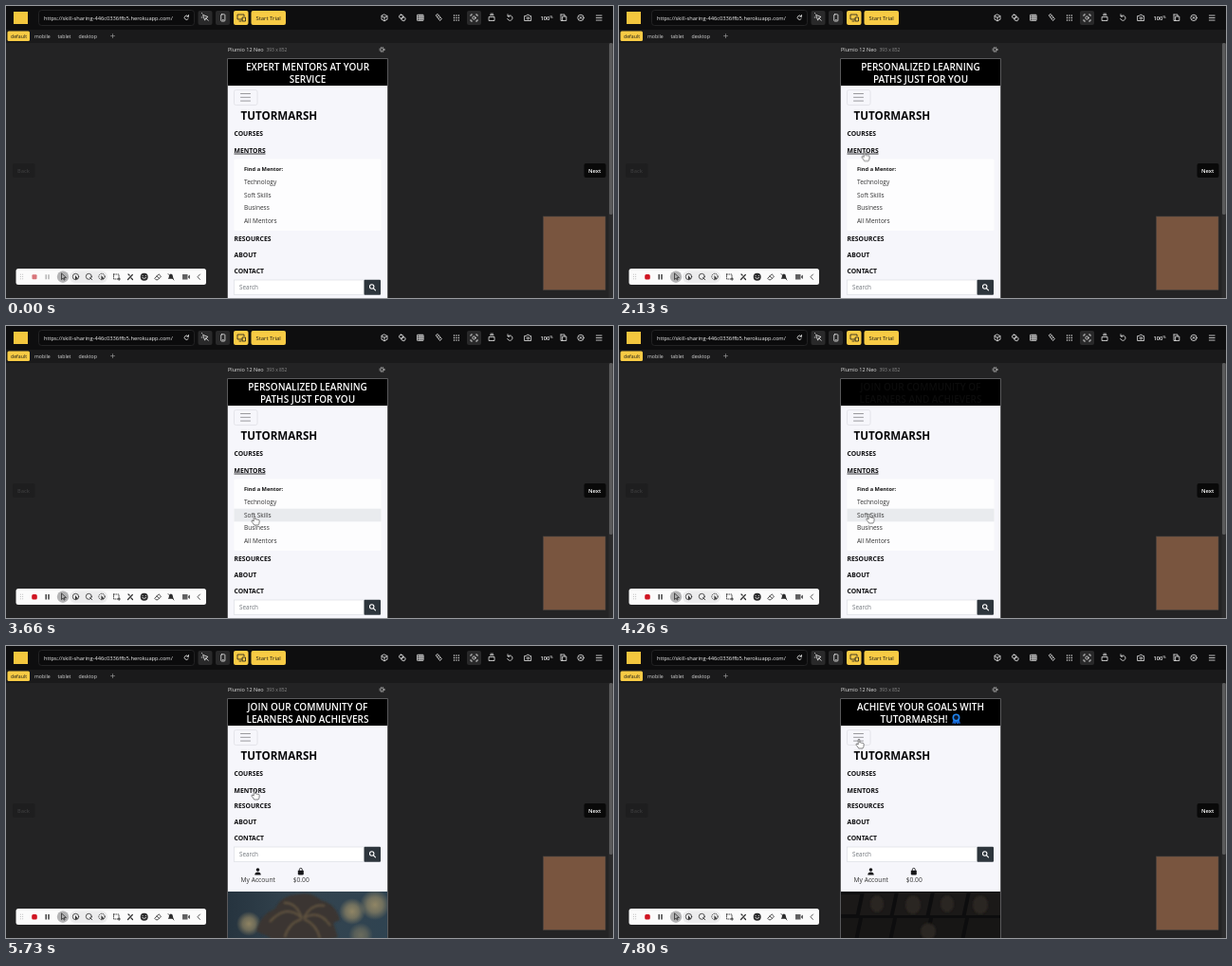
An HTML page that plays this animation: 640x308 px, repeating every 8000 ms.

```html
<!DOCTYPE html>
<html lang="en">
<head>
<meta charset="utf-8">
<title>Responsive preview</title>
<style>
html, body { margin: 0; width: 100%; height: 100%; overflow: hidden; background: #232324; }
svg { display: block; width: 100vw; height: 100vh; font-family: "Open Sans", "Noto Sans", sans-serif; }
.line { fill: none; stroke: currentColor; stroke-width: .8; stroke-linecap: round; stroke-linejoin: round; }
.solid { fill: currentColor; stroke: none; }
.semi { font-weight: 600; }
.bold { font-weight: 700; }
.nav { font-size: 6.8px; font-weight: 700; fill: #0b0b0d; }
.links { font-size: 6.5px; fill: #333; }
.banner { font-size: 10px; font-weight: 600; fill: #fff; text-anchor: middle; }

/* Everything shares one 8 s timeline. */
.message, .cursor, .arrow, .hand, .row, .menu, .lower, .rec, .idle, .slide {
  animation: 8s linear infinite both;
}
.message { animation-timing-function: ease; }
.m1 { animation-name: m1; }
.m2 { animation-name: m2; }
.m3 { animation-name: m3; }
.m4 { animation-name: m4; }
@keyframes m1 { 0%, 9.125% { opacity: 1 } 15.375%, 100% { opacity: 0 } }
@keyframes m2 { 0%, 15.375% { opacity: 0 } 21.625%, 46.625% { opacity: 1 } 52.875%, 100% { opacity: 0 } }
@keyframes m3 { 0%, 52.875% { opacity: 0 } 59.125%, 84.125% { opacity: 1 } 90.375%, 100% { opacity: 0 } }
@keyframes m4 { 0%, 90.375% { opacity: 0 } 96.625%, 100% { opacity: 1 } }

.cursor { animation-name: travel; animation-timing-function: ease-in-out; }
@keyframes travel {
  0%, 18.25% { transform: translate(46px, 284px) }
  26%, 29.1% { transform: translate(259px, 153.5px) }
  33.2%, 35% { transform: translate(261px, 178px) }
  45%, 49% { transform: translate(262px, 200px) }
  60%, 62% { transform: translate(268px, 193.5px) }
  70%, 72% { transform: translate(262px, 152px) }
  77.5%, 100% { transform: translate(253px, 98px) }
}
.arrow, .hand, .row, .menu, .lower, .rec, .idle { animation-timing-function: step-end; }
.arrow { animation-name: arrow; }
.hand { animation-name: hand; }
@keyframes arrow { 0% { opacity: 0 } 18.25% { opacity: 1 } 24.5%, 100% { opacity: 0 } }
@keyframes hand { 0% { opacity: 0 } 24.5%, 100% { opacity: 1 } }

.tech { animation-name: tech; }
.soft { animation-name: soft; }
@keyframes tech { 0% { opacity: 0 } 33.2% { opacity: 1 } 41.5% { opacity: 0 } 63.5% { opacity: 1 } 66%, 100% { opacity: 0 } }
@keyframes soft { 0% { opacity: 0 } 41.5% { opacity: 1 } 63.5%, 100% { opacity: 0 } }

.menu { animation-name: menu; }
.lower { animation-name: lift; }
@keyframes menu { 0% { opacity: 1 } 71%, 100% { opacity: 0 } }
@keyframes lift { 0% { transform: none } 71%, 100% { transform: translateY(-77px) } }

.idle { animation-name: idle; }
.rec { animation-name: rec; }
@keyframes idle { 0% { opacity: 1 } 7.5%, 100% { opacity: 0 } }
@keyframes rec { 0% { opacity: 0 } 7.5%, 100% { opacity: 1 } }

.slide { animation-name: slide; }
@keyframes slide { 0%, 89% { opacity: 0 } 95%, 100% { opacity: 1 } }
</style>
</head>
<body>
<svg viewBox="0 0 640 308" preserveAspectRatio="none">
  <defs>
    <clipPath id="screen"><rect x="234" y="56" width="168" height="252"/></clipPath>
    <clipPath id="hero"><rect width="168" height="60"/></clipPath>
    <linearGradient id="dusk">
      <stop stop-color="#26343f"/><stop offset=".45" stop-color="#34444f"/><stop offset="1" stop-color="#2f4351"/>
    </linearGradient>
    <radialGradient id="glow">
      <stop stop-color="#a8966a" stop-opacity=".8"/><stop offset=".5" stop-color="#a8966a" stop-opacity=".55"/>
      <stop offset="1" stop-color="#a8966a" stop-opacity="0"/>
    </radialGradient>
    <filter id="blur"><feGaussianBlur stdDeviation="1.2"/></filter>
  </defs>

  <!-- Application frame -->
  <rect width="640" height="308" fill="#232324"/>
  <rect width="640" height="25" fill="#0e0e0f"/>
  <rect y="25" width="640" height="14" fill="#1a1a1b"/>
  <rect x="635.5" y="39" width="4.5" height="269" fill="#2c2c2d"/>
  <rect x="636" y="39" width="3.6" height="181" rx="1.5" fill="#5b5b5c"/>

  <rect x="8" y="6" width="15" height="13" fill="#f3c63e"/>
  <rect x="34.5" y="4.5" width="164" height="16" rx="3" fill="#0b0b0c" stroke="#2d2d2e" stroke-width=".7"/>
  <text x="40" y="14.7" font-size="5.75" fill="#f2f2f2">https://skill-sharing-446c0336ffb5.herokuapp.com/</text>

  <g fill="#29292a">
    <rect x="202.5" y="5" width="15" height="15" rx="2"/>
    <rect x="221" y="5" width="15" height="15" rx="2"/>
    <rect x="486" y="5" width="15" height="15" rx="2"/>
  </g>
  <g fill="#f8cb45">
    <rect x="240" y="5" width="15.5" height="15" rx="2"/>
    <rect x="258.5" y="5" width="36.5" height="15" rx="2"/>
    <rect x="1.5" y="26.5" width="23.5" height="10.5" rx="1.5"/>
  </g>
  <text x="263.5" y="14.8" font-size="5.9" font-weight="500" fill="#171717">Start Trial</text>

  <g class="line" color="#e9e9e9">
    <path d="M192.2 11A2.2 2.2 0 1 0 192.300 13.300M192.500 9.500v1.700h-1.700"/>
    <path d="M208 9.500l5 2-2.200 1-1 2.300zM211 13l2.200 2.300M207 8l-.6-.6M207 12h-.8"/>
    <rect x="226.700" y="8.800" width="4.200" height="7.200" rx=".8"/>
    <path d="M228.300 14.700h1"/>
    <path color="#1b1b1b" d="M249 14h-5V9h7v1.500M246 16h2M249.500 12h3v4h-3z"/>
    <path d="M399 9l3 1.600v3.600l-3 1.600-3-1.600v-3.600zM396 10.600l3 1.600 3-1.600M399 12.200v3.600"/>
    <rect x="414.800" y="9.500" width="4" height="3.600" rx="1" transform="rotate(20 417 11)"/>
    <rect x="417" y="11.800" width="4" height="3.600" rx="1" transform="rotate(20 419 13.500)"/>
    <path d="M434 9.300h6v6h-6zM436 9.300v6M438 9.300v6M434 11.300h6M434 13.300h6"/>
    <path d="M453.500 9.600l1.600-1.200 4.300 5.300-1.600 1.500zM455 11.300l1-.8M456.500 13l1-.8"/>
    <path d="M490 10.500V9h1.500M495.500 9h1.500v1.500M497 14.500V16h-1.500M491.500 16H490v-1.500"/>
    <circle cx="493.500" cy="12.500" r="1.600"/>
    <path d="M509.500 11.500h5.500v4h-5.500zM510.500 9.600h3.500M511 8.200h2.500"/>
    <path d="M529.300 10.800A2.700 2.700 0 1 1 528.700 13.500M529 8.800v2.200h2.200"/>
    <path d="M547 10.500h1.500l.8-1.200h2l.8 1.200h1.500v5H547z"/>
    <circle cx="550.300" cy="12.800" r="1.200"/>
    <path d="M585 9h4v2M585 9v6.500h2M587 11h3.800v4.500H587z"/>
    <circle cx="606" cy="12.400" r="3.200"/>
    <path d="M604.800 11.200l2.400 2.400M607.200 11.200l-2.400 2.400"/>
    <path d="M622.300 10h5.800M622.300 12.500h5.800M622.300 15h5.800"/>
    <path stroke-dasharray="0 2.400" style="stroke-width:1.4" d="M472.500 10h5M472.500 12.500h5M472.500 15h5"/>
  </g>
  <text class="semi" x="563.5" y="14.5" font-size="5.8" fill="#f4f4f4">100<tspan font-size="3.5" dy="-1.5">%</tspan></text>

  <g font-size="5.2" fill="#d8d8d8">
    <text x="5" y="33.6" fill="#161616">default</text>
    <text x="30" y="33.6">mobile</text>
    <text x="54.5" y="33.6">tablet</text>
    <text x="76.5" y="33.6">desktop</text>
  </g>
  <path class="line" color="#aaa" style="stroke-width:.6" d="M110.500 31.600h4M112.500 29.600v4"/>

  <text x="234" y="48" font-size="5.5" fill="#dedede">Plumio 12 Neo</text>
  <text x="274.5" y="48" font-size="4.9" fill="#8d8d8d">393 x 852</text>
  <g class="line" color="#bdbdbd">
    <circle cx="396.5" cy="46" r="1.7"/>
    <circle cx="396.5" cy="46" r="2.700" stroke-dasharray="1 1.200" stroke-linecap="butt"/>
  </g>

  <rect x="7" y="166" width="23.5" height="15" rx="2" fill="#1e1e1f"/>
  <text class="semi" x="12" y="175.7" font-size="5.6" fill="#3b3b3c">Back</text>
  <rect x="609.5" y="166" width="23" height="15" rx="2" fill="#090909"/>
  <text class="semi" x="614" y="175.7" font-size="5.8" fill="#fff">Next</text>

  <!-- Previewed page -->
  <rect x="233.5" y="55.5" width="169" height="260" fill="#f6f6fb" stroke="#444445" stroke-width=".7"/>
  <g clip-path="url(#screen)">
    <rect x="234" y="56" width="168" height="28" fill="#000"/>
    <g class="banner">
      <g class="message m1"><text x="318" y="68">EXPERT MENTORS AT YOUR</text><text x="318" y="80.5">SERVICE</text></g>
      <g class="message m2"><text x="318" y="68">PERSONALIZED LEARNING</text><text x="318" y="80.5">PATHS JUST FOR YOU</text></g>
      <g class="message m3"><text x="318" y="68">JOIN OUR COMMUNITY OF</text><text x="318" y="80.5">LEARNERS AND ACHIEVERS</text></g>
      <g class="message m4">
        <text x="318" y="68">ACHIEVE YOUR GOALS WITH</text><text x="311" y="80.5">TUTORMARSH!</text>
        <path d="M352.800 77l-1.600 4.800 2.200-.4 1.200 1.200 1-2 1 2 1.200-1.200 2.200.4-1.600-4.800z" fill="#1663cf"/>
        <circle cx="355.5" cy="75.5" r="3.2" fill="#0b1830" stroke="#1f86f2" stroke-width="1.6"/>
      </g>
    </g>

    <rect x="240.5" y="88.5" width="24.5" height="16" rx="2" fill="none" stroke="#e0e0e6" stroke-width=".8"/>
    <path class="line" color="#828286" d="M247.500 92.500h10M247.500 96.300h10M247.500 100.100h10"/>
    <text class="bold" x="247.5" y="120.3" font-size="11.6" fill="#08080a">TUTORMARSH</text>
    <g class="nav"><text x="240.5" y="137">COURSES</text><text x="240.5" y="154.5">MENTORS</text></g>

    <g class="menu">
      <path d="M240.500 156h33" stroke="#0b0b0d" stroke-width=".8"/>
      <rect x="240.5" y="161.5" width="155" height="75.5" rx="1.5" fill="#fdfdfe"/>
      <rect class="row tech" x="240.5" y="179" width="155" height="13.7" fill="#e9ebee"/>
      <rect class="row soft" x="240.5" y="192.7" width="155" height="13.6" fill="#e9ebee"/>
      <text class="bold" x="251" y="173.7" font-size="5.7" fill="#111">Find a Mentor:</text>
      <g class="links">
        <text x="251" y="188">Technology</text>
        <text x="251" y="201.7">Soft Skills</text>
        <text x="251" y="215.4">Business</text>
        <text x="251" y="229.2">All Mentors</text>
      </g>
    </g>

    <g class="lower">
      <g class="nav">
        <text x="240.5" y="248.2">RESOURCES</text>
        <text x="240.5" y="265.2">ABOUT</text>
        <text x="240.5" y="282.4">CONTACT</text>
      </g>
      <rect x="240.5" y="289" width="138" height="15.5" fill="#fff" stroke="#dcdfe4" stroke-width=".7"/>
      <text x="246" y="299.3" font-size="6.3" fill="#70757b">Search</text>
      <rect x="377.5" y="288.7" width="17.5" height="16" rx="1" fill="#2d353c"/>
      <g class="line" color="#fff" style="stroke-width:1.1"><circle cx="385.7" cy="296" r="2.2"/><path d="M387.500 297.800l2 2"/></g>
      <g fill="#161619">
        <circle cx="265.5" cy="313" r="1.8"/>
        <path d="M262.300 318.500q0-3 3.200-3t3.200 3z"/>
        <path d="M307.800 313.700h6v3.600q0 1.200-1.200 1.200h-3.600q-1.200 0-1.200-1.200z"/>
        <path class="line" color="#161619" d="M309.300 314v-1.200a1.500 1.500 0 0 1 3 0v1.200"/>
      </g>
      <g fill="#333" font-size="6.7"><text x="247.5" y="326.4">My Account</text><text x="302.7" y="326.4">$0.00</text></g>

      <g transform="translate(234 336)" clip-path="url(#hero)">
        <rect width="168" height="60" fill="url(#dusk)"/>
        <g fill="url(#glow)">
          <circle cx="155" cy="14" r="16"/><circle cx="131" cy="21" r="14"/>
          <circle cx="22" cy="34" r="13"/><circle cx="140" cy="46" r="13" opacity=".6"/>
        </g>
        <g filter="url(#blur)">
          <path fill="#3a3630" d="M30 42q4-18 20-24 6-14 24-15 14-3 24 6 16 4 20 21l-7 3 5 15-14 4-4 8H48l-4-12z"/>
          <path fill="none" stroke="#61523f" stroke-width="2" d="M78 28q-16-16-34 4M78 28q-6-17-19-16M80 28q8-16 22-13M80 28q16-10 28 8M78 29q-14 4-18 19M80 29q13 5 17 20"/>
        </g>
        <g class="slide">
          <rect width="168" height="60" fill="#0d0d0e"/>
          <g transform="skewX(-12)" fill="#1b1918">
            <path d="M-8 3h29v21H-8zM25 2h32v23H25zM61 1h34v24H61zM99 1h34v24H99zM137 1h44v24h-44z"/>
            <path d="M-5 28h30v24H-5zM29 28h32v24H29zM65 28h34v24H65zM103 28h34v24h-34zM141 28h44v24h-44z" fill="#171615"/>
          </g>
          <g fill="#2b2521" filter="url(#blur)">
            <ellipse cx="38" cy="13" rx="7" ry="9"/><ellipse cx="76" cy="14" rx="8" ry="10"/>
            <ellipse cx="112" cy="13" rx="7" ry="9"/><ellipse cx="147" cy="14" rx="8" ry="10"/>
            <ellipse cx="92" cy="42" rx="8" ry="9"/>
          </g>
        </g>
      </g>
    </g>
  </g>

  <!-- Picture overlay -->
  <rect x="566.5" y="222" width="65.5" height="77.5" fill="#79553f" stroke="#4d4642" stroke-width=".6"/>

  <!-- Recorder toolbar -->
  <rect x="10.5" y="277" width="200.5" height="17" rx="2.5" fill="#fbfbfb"/>
  <path class="line" color="#999" stroke-dasharray="0 2.300" d="M15.300 283.200v5M17.700 283.200v5"/>
  <g class="idle"><rect x="27.5" y="283.3" width="5" height="5" rx="1" fill="#d8757b"/><path d="M42.200 283.300v5M45 283.300v5" stroke="#aaa" stroke-width="1.3"/></g>
  <g class="rec"><rect x="27.2" y="283" width="5.6" height="5.6" rx="1.7" fill="#d01522"/><path d="M42.200 283v5.500M45 283v5.500" stroke="#333" stroke-width="1.4"/></g>
  <rect x="67" y="279.5" width="40" height="12.5" rx="6" fill="#ececed"/>
  <circle cx="60" cy="285.7" r="6.2" fill="#b4b4b5"/>
  <g class="line" color="#2c2c2d">
    <path d="M58.500 282.300v6.300l1.600-1.500 1.200 2 .8-.5-1-2h2z"/>
    <circle cx="73.5" cy="285.5" r="3.2"/><path class="solid" d="M73 284v5l1.300-1.200 1.800.2z"/>
    <circle cx="87.3" cy="285.3" r="3"/><path d="M88.500 286.500l2.300 2.300"/>
    <circle cx="101" cy="285.5" r="3.2" stroke-dasharray="1 1.300"/><path class="solid" d="M100.500 284v5l1.300-1.200 1.800.2z"/>
    <path stroke-dasharray="1 1.300" d="M113.500 283h5.500v5h-5.500z"/><path d="M118 288h2.500M119.200 286.800v2.500"/>
    <path style="stroke-width:1.2" d="M128.500 288.500l4.800-5M129 283l1.200 1.200M132 287l1.500 1.500"/>
    <circle class="solid" cx="145.7" cy="285.7" r="4"/>
    <path color="#fff" class="line" d="M144 284.500h.1M147.300 284.500h.1M143.800 286.700q1.900 1.800 3.800 0"/>
    <path d="M157 287l4-4.200 2.500 2.300-3.500 3.700h-1.500zM159 285l2.500 2.300"/>
    <path class="solid" d="M170.700 287.800q1.200-1 1.200-2.800 0-2.200 2-2.400 2 .2 2 2.400 0 1.800 1.200 2.800z"/><path d="M171 282.500l6 6.500"/>
    <path class="solid" d="M186 283h5.500v5.500H186zM192 285l2-1.500v4.500l-2-1.500z" opacity=".75"/>
    <path d="M204.500 283l-2.500 2.700 2.500 2.700"/>
  </g>

  <g class="cursor">
    <path class="arrow" d="M0 0v8l1.900-1.700 1.300 2.700 1.200-.6-1.300-2.600h2.600z" fill="#fff" stroke="#111" stroke-width=".5"/>
    <path class="hand" d="M-.8.700Q0-.5.800.7V4q.8-.6 1.500.2.900-.5 1.500.3 1.200-.3 1.300.9V7Q5 8.700 4 10H-.3Q-1.500 8-3 6.200q-.2-1.300 1-1.200l1.200 1z" fill="#fff" stroke="#333" stroke-width=".6"/>
  </g>
</svg>
</body>
</html>
```
